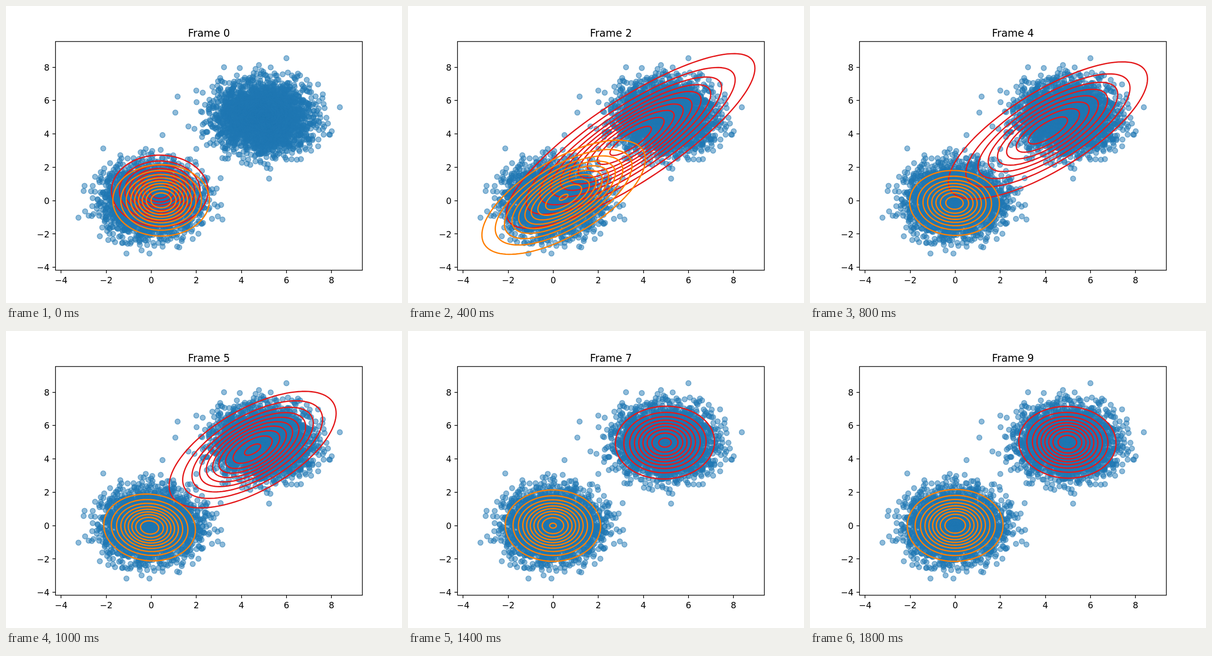
These frames come from a looping animation (864x648 px, 2 s). An HTML page with a canvas:

```html
<!DOCTYPE html>
<html lang="en">
<head>
<meta charset="utf-8">
<title>Two clusters</title>
<style>
html, body { margin: 0; width: 100%; height: 100%; overflow: hidden; background: #fff; }
canvas, svg { position: absolute; left: 0; top: 0; width: 864px; height: 648px; }
text { font-family: "DejaVu Sans", sans-serif; font-size: 18.75px; fill: #000; }
#title { font-size: 22.5px; text-anchor: middle; }
path { fill: none; stroke-width: 2.8125; stroke-linejoin: round; }
#axes path { stroke: #000; stroke-width: 1.5; stroke-linejoin: miter; }
</style>
</head>
<body>
<canvas id="dots" width="864" height="648"></canvas>
<svg viewBox="0 0 864 648">
  <path id="red" stroke="#e41a1c"/>
  <path id="orange" stroke="#ff7f00"/>
  <g id="axes"></g>
  <text id="title" x="442.8" y="66.5">Frame 0</text>
</svg>
<script>
const start = performance.now();
const STEP = 200, COUNT = 10, TURN = 2 * Math.PI;
const $ = id => document.getElementById(id);
const px = x => 316.9 + 49.16 * x;
const py = y => 424.7 - 36.39 * y;

// The most isolated points; all others are drawn at random
const far = [
  [-3.23, -1.02], [-2.13, 3.13], [-3, .58], [-.08, -3.17], [-1.1, -3.17],
  [3.1, -.26], [3.16, -1.13], [3.08, 1.35], [.5, 3.93], [2, 3.1],
  [6, 8.54], [4.78, 8.13], [3.23, 8], [1.17, 6.24], [1.07, 5.28],
  [8.37, 5.6], [2, 6.6], [1.65, 4.45], [5.23, 1.32], [7.93, 3.95]
];

function random(seed) {
  return () => {
    seed = seed + 0x6D2B79F5 | 0;
    let t = Math.imul(seed ^ seed >>> 15, 1 | seed);
    t = t + Math.imul(t ^ t >>> 7, 61 | t) ^ t;
    return ((t ^ t >>> 14) >>> 0) / 4294967296;
  };
}

// Round normal cluster: even radius quantiles and jittered golden angles keep it balanced
function cluster(mean, spread, rnd, n = 3000, reach = 3.1) {
  const tail = Math.exp(-reach * reach / 2);
  return Array.from({ length: n }, (_, i) => {
    const u = (i + rnd()) / n;
    const r = spread * Math.sqrt(-2 * Math.log(1 - (1 - tail) * u));
    const a = i * 2.39996 + 2 * rnd();
    return [mean + r * Math.cos(a), mean + r * Math.sin(a)];
  });
}

const rnd = random(42);
const points = [...cluster(0, 1.01, rnd), ...cluster(5, 1.02, rnd), ...far];

const det = g => g.xx * g.yy - g.xy * g.xy;
const peak = g => g.w / (TURN * Math.sqrt(det(g)));

function density(g, x, y) {
  const u = x - g.x, v = y - g.y;
  const q = (g.yy * u * u - 2 * g.xy * u * v + g.xx * v * v) / det(g);
  return peak(g) * Math.exp(-q / 2);
}

// One expectation-maximisation step for a pair of normal components
function refine(pair) {
  const sums = pair.map(() => ({ n: 0, x: 0, y: 0, xx: 0, xy: 0, yy: 0 }));
  for (const [x, y] of points) {
    const p = pair.map(g => density(g, x, y));
    sums.forEach((s, i) => {
      const r = p[i] / (p[0] + p[1]);
      s.n += r;
      s.x += r * x;
      s.y += r * y;
      s.xx += r * x * x;
      s.xy += r * x * y;
      s.yy += r * y * y;
    });
  }
  return sums.map(s => {
    const x = s.x / s.n, y = s.y / s.n;
    return {
      w: s.n / points.length, x, y,
      xx: s.xx / s.n - x * x,
      xy: s.xy / s.n - x * y,
      yy: s.yy / s.n - y * y
    };
  });
}

const unit = (x, y) => ({ w: .5, x, y, xx: 1, xy: 0, yy: 1 });
const fits = [[unit(.378, .587), unit(.439, .019)]];
while (fits.length < COUNT) fits.push(refine(fits[fits.length - 1]));

// Smallest round step that needs at most eleven levels
function niceStep(top) {
  const raw = top / 11, unit = 10 ** Math.floor(Math.log10(raw));
  return unit * [1, 1.5, 2, 2.5, 3, 4, 5, 6, 8, 10].find(m => m * unit >= raw);
}

function rings(g) {
  const sx = Math.sqrt(g.xx), sy = Math.sqrt(g.yy);
  const rho = g.xy / (sx * sy), side = Math.sqrt(1 - rho * rho);
  const top = peak(g), step = niceStep(top), n = 120;
  let d = "";
  for (let k = 1; k * step < top; k++) {
    const r = Math.sqrt(2 * Math.log(top / (k * step)));
    for (let i = 0; i < n; i++) {
      const a = TURN * i / n, u = Math.cos(a);
      const x = px(g.x + r * sx * u);
      const y = py(g.y + r * sy * (rho * u + side * Math.sin(a)));
      d += (i ? "L" : "M") + x.toFixed(2) + " " + y.toFixed(2);
    }
    d += "Z";
  }
  return d;
}

function drawDots() {
  const c = $("dots").getContext("2d");
  c.fillStyle = c.strokeStyle = "rgba(31,119,180,.5)";
  c.lineWidth = 1.875;
  for (const [x, y] of points) {
    c.beginPath();
    c.arc(px(x), py(y), 5.625, 0, TURN);
    c.fill();
    c.stroke();
  }
}

function drawAxes() {
  let d = "M108 77.5H777.5V576.5H108Z", labels = "";
  const label = (x, y, v, anchor) => {
    const s = String(v).replace("-", "\u2212");
    labels += `<text x="${x}" y="${y}" text-anchor="${anchor}">${s}</text>`;
  };
  for (let v = -4; v <= 8; v += 2) {
    const x = px(v), y = py(v);
    d += `M${Math.round(x)} 576.5v6.56M108 ${Math.round(y)}h-6.56`;
    label(x, 604.6, v, "middle");
    label(94.9, y + 7.1, v, "end");
  }
  $("axes").innerHTML = `<path d="${d}"/>` + labels;
}

let shown = -1;
function update() {
  const i = Math.floor((performance.now() - start) / STEP) % COUNT;
  if (i !== shown) {
    shown = i;
    $("red").setAttribute("d", rings(fits[i][0]));
    $("orange").setAttribute("d", rings(fits[i][1]));
    $("title").textContent = "Frame " + i;
  }
  requestAnimationFrame(update);
}

drawDots();
drawAxes();
update();
</script>
</body>
</html>
```
